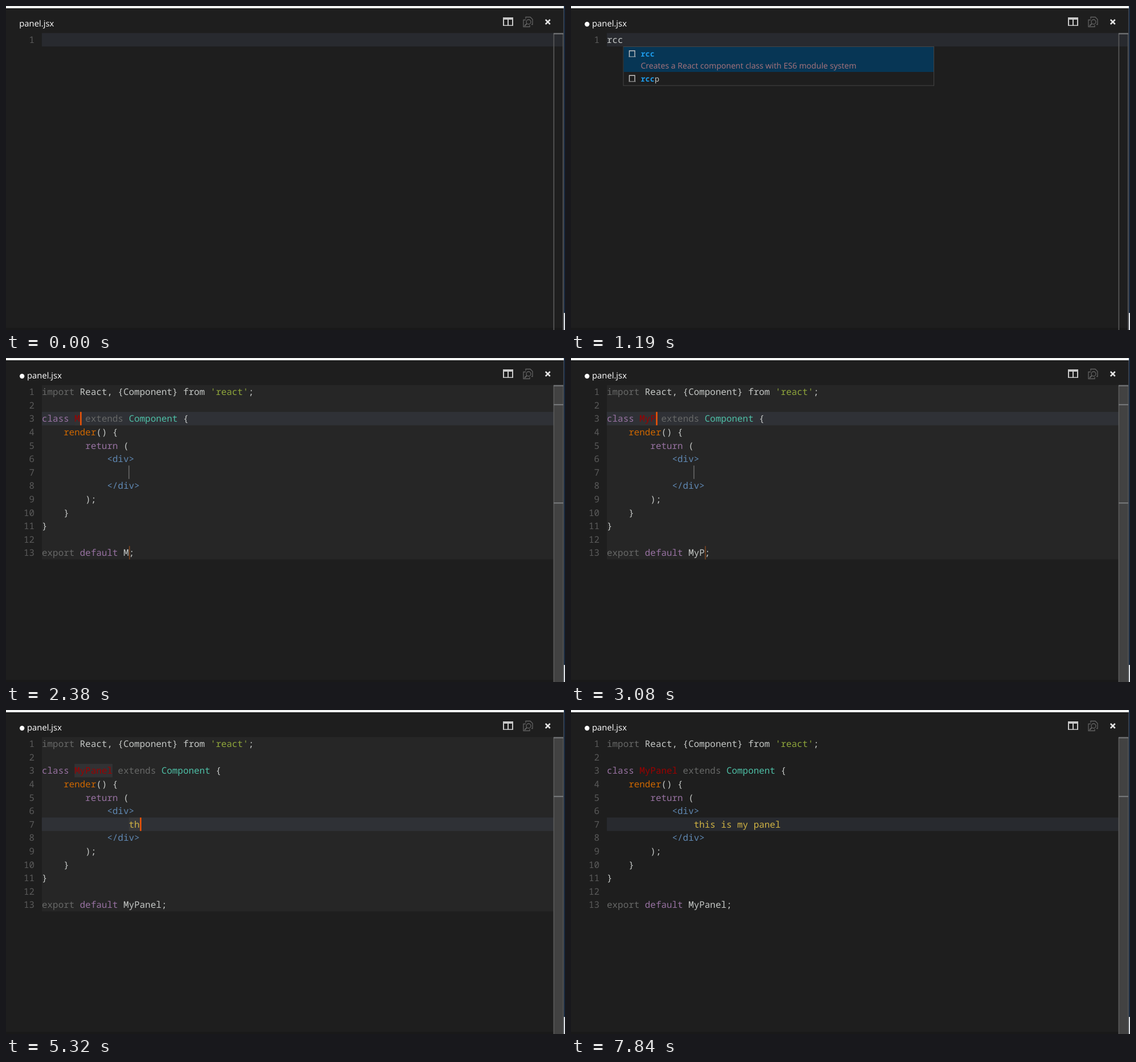
Animation of 982 by 570 pixels, one loop 8000 ms. Source, as an HTML page:

```html
<!DOCTYPE html>
<html lang="en">
<head>
<meta charset="utf-8">
<title>Snippet demo</title>
<style>
  html, body { margin: 0; width: 100%; height: 100%; overflow: hidden; background: #1e1e1e; }
  svg { display: block; width: 982px; height: 570px; }
  text { white-space: pre; text-rendering: geometricPrecision; }
  .mono { font-family: "Noto Sans Mono", "DejaVu Sans Mono", monospace; font-size: 15.92px; }
  .ui { font-family: "Open Sans", "Noto Sans", sans-serif; }
  .hint { font-size: 13.6px; }
</style>
</head>
<body>
<svg id="stage" viewBox="0 0 982 570" xmlns="http://www.w3.org/2000/svg"></svg>
<script>
const LOOP = 8000;
const COL = 9.552, LEFT = 63, ROW = 23.6, TOP = 47.6;
const C = {
  plain: "#c5c8c6", dim: "#676867", key: "#9872a2", name: "#9b0000", fn: "#ce6700",
  str: "#8fa63b", tag: "#6089b4", type: "#4ebfa6", jsx: "#d0b344",
  num: "#5a5a5a", cursor: "#fc5604", mark: "#8a4a20"
};

const colX = c => LEFT + c * COL;
const rowY = n => TOP + (n - 1) * ROW;
const rect = (x, y, w, h, fill, extra = "") =>
  `<rect x="${x}" y="${y}" width="${w}" height="${h}" fill="${fill}" ${extra}/>`;
const esc = s => s.replace(/&/g, "&amp;").replace(/</g, "&lt;");
const text = (x, y, s, fill, cls, extra = "") =>
  `<text x="${x}" y="${y}" fill="${fill}" class="${cls}" ${extra}>${esc(s)}</text>`;
const bar = (row, col, fill, w) => rect(colX(col) + 0.4, rowY(row), w, ROW, fill);
const box = (row, col, len, fill) => rect(colX(col), rowY(row), len * COL, ROW, fill);
const highlight = row => rect(LEFT, rowY(row), 916, ROW, "#8090c0", 'fill-opacity=".1"');

// How many key presses have happened by time t
const typed = (times, t) => times.filter(k => k <= t).length;
const KEYS = {
  prefix: [210, 630, 770],
  name: [2380, 2660, 3080, 3220, 3430, 3920, 4200],
  body: [5250, 5320, 5390, 5460, 5600, 5670, 5740, 5880, 6090, 6230, 6370,
         6860, 7000, 7140, 7280, 7420]
};

function codeLine(row, parts) {
  const spans = parts.map(([kind, s]) => `<tspan fill="${C[kind]}">${esc(s)}</tspan>`).join("");
  return `<text x="${LEFT}" y="${rowY(row) + 17.5}" class="mono">${spans}</text>`;
}

function lineNumber(n) {
  return text(50, rowY(n) + 17.5, String(n), C.num, "mono", 'text-anchor="end"');
}

function header(dirty) {
  const title = dirty
    ? `<circle cx="28.2" cy="32" r="4.2" fill="#fff"/>` + text(37, 36, "panel.jsx", "#fff", "ui", 'font-size="14.8"')
    : text(23.3, 36, "panel.jsx", "#fff", "ui", 'font-size="14.8"');
  return title +
    `<path d="M873 20h18v15h-18z M875 24v9.5h6v-9.5z M883 24v9.5h6v-9.5z" fill="#c8c8c8" fill-rule="evenodd"/>
     <g fill="none" stroke="#626262" stroke-width="1.3">
       <path d="M913 24.5h-4v12h11v-3 M913 22.5v-3h8l4 4v9h-2"/>
       <circle cx="918" cy="28" r="4"/>
       <path d="M915 31l-4 4" stroke-width="2"/>
     </g>
     <path d="M947.8 24l8 8m0-8l-8 8" stroke="#e4e4e4" stroke-width="2.5" fill="none"/>`;
}

function frameEdges() {
  return rect(0, 566, 979, 4, "#191919") + rect(0, 0, 980, 4, "#f2f4f3") +
    rect(979, 4, 1, 566, "#484b50") + rect(980, 0, 2, 540, "#1b2c42") +
    rect(980, 540, 2, 30, "#dfe3e8");
}

function ruler(filled, marks) {
  const fill = filled ? rect(962, 48, 17, 522, "#424242") : "";
  return fill + rect(961.6, 48, 1.6, 522, "#5c5c5c") + rect(977.8, 48, 1.2, 522, "#505050") +
    marks.map(y => rect(962, y - 1, 17, 2.2, "#747678")).join("");
}

function popup() {
  const icon = y => `<path d="M102.5 ${y + 11}v-10.3h9.6v10.3" fill="none" stroke="#c5c5c5" stroke-width="1.4"/>
    <path d="M101.8 ${y + 11.3}h11.4" stroke="#c5c5c5" stroke-width="1.5" stroke-dasharray="1.5 1"/>`;
  const label = (y, s, fill, x, weight) => text(x, y, s, fill, "mono hint", `style="font-weight:${weight}"`);
  return rect(92, 71.5, 545.5, 68.5, "#1e1e1e", 'stroke="#454545"') +
    rect(92.5, 72, 544.5, 44, "#073655") +
    icon(78) + icon(121.5) +
    label(88.7, "rcc", "#1d9bea", 122.4, 700) +
    text(122.4, 110, "Creates a React component class with ES6 module system", "#aa757d", "ui", 'font-size="14.1"') +
    label(132.7, "rcc", "#1d9bea", 122.4, 700) +
    label(132.7, "p", C.plain, 122.4 + 3 * 8.16, 400);
}

function drawPrefix(t) {
  const n = typed(KEYS.prefix, t);
  let out = highlight(1) + lineNumber(1) + codeLine(1, [["plain", "rcc".slice(0, n)]]);
  if (n && t < 1190) out += bar(1, n, C.cursor, 2.4);
  out += ruler(false, [48.6]);
  if (t >= 1050) out += popup();
  return out;
}

function drawSnippet(t) {
  const n = typed(KEYS.name, t);
  const name = n ? "MyPanel".slice(0, n) : "componentName";
  const m = typed(KEYS.body, t);
  const body = "this is my panel".slice(0, m);
  const inBody = t >= 4620, done = t >= 7840;
  let out = "";

  if (!done) out += rect(LEFT, TOP, 916, 13 * ROW, "#fff", 'fill-opacity=".035"');
  if (inBody) out += highlight(7);
  else if (n) out += highlight(3);

  if (!done) {
    out += box(3, 6, name.length, n ? "#323234" : "#4d5664");
    if (!n) out += box(13, 15, name.length, "#4d5664");
    if (inBody) out += box(7, 16, m, "#38393b");
    else out += rect(215.2, rowY(7), 1.5, ROW, "#6c6c6c");
  }

  const lines = [
    [["dim", "import "], ["plain", "React, {Component} from "], ["str", "'react'"], ["plain", ";"]],
    [],
    [["key", "class "], ["name", name], ["dim", " extends "], ["type", "Component"], ["plain", " {"]],
    [["fn", "    render"], ["plain", "() {"]],
    [["key", "        return"], ["plain", " ("]],
    [["tag", "            <div>"]],
    [["jsx", " ".repeat(16) + body]],
    [["tag", "            </div>"]],
    [["plain", "        );"]],
    [["plain", "    }"]],
    [["plain", "}"]],
    [],
    [["dim", "export "], ["key", "default "], ["plain", name + ";"]]
  ];
  lines.forEach((parts, i) => { out += lineNumber(i + 1) + codeLine(i + 1, parts); });

  if (!inBody && (t < 1890 || n)) {
    out += bar(3, 6 + name.length, C.cursor, 2.4) + bar(13, 15 + name.length, C.mark, 1.4);
  }
  const bodyBlink = t >= 5040 && !m;
  if (inBody && !done && !bodyBlink) out += bar(7, 16 + m, C.cursor, 2.4);

  return out + ruler(true, inBody ? [48.6, 152] : [48.6, 82, 255]);
}

const stage = document.getElementById("stage");
let last = "";

function render(t) {
  const scene = rect(0, 0, 982, 570, "#1e1e1e") + frameEdges() + header(t >= 210) +
    (t < 1540 ? drawPrefix(t) : drawSnippet(t));
  if (scene !== last) stage.innerHTML = last = scene;
}

const start = performance.now();
function tick() {
  render((performance.now() - start) % LOOP);
  requestAnimationFrame(tick);
}
render(0);
requestAnimationFrame(tick);
</script>
</body>
</html>
```
